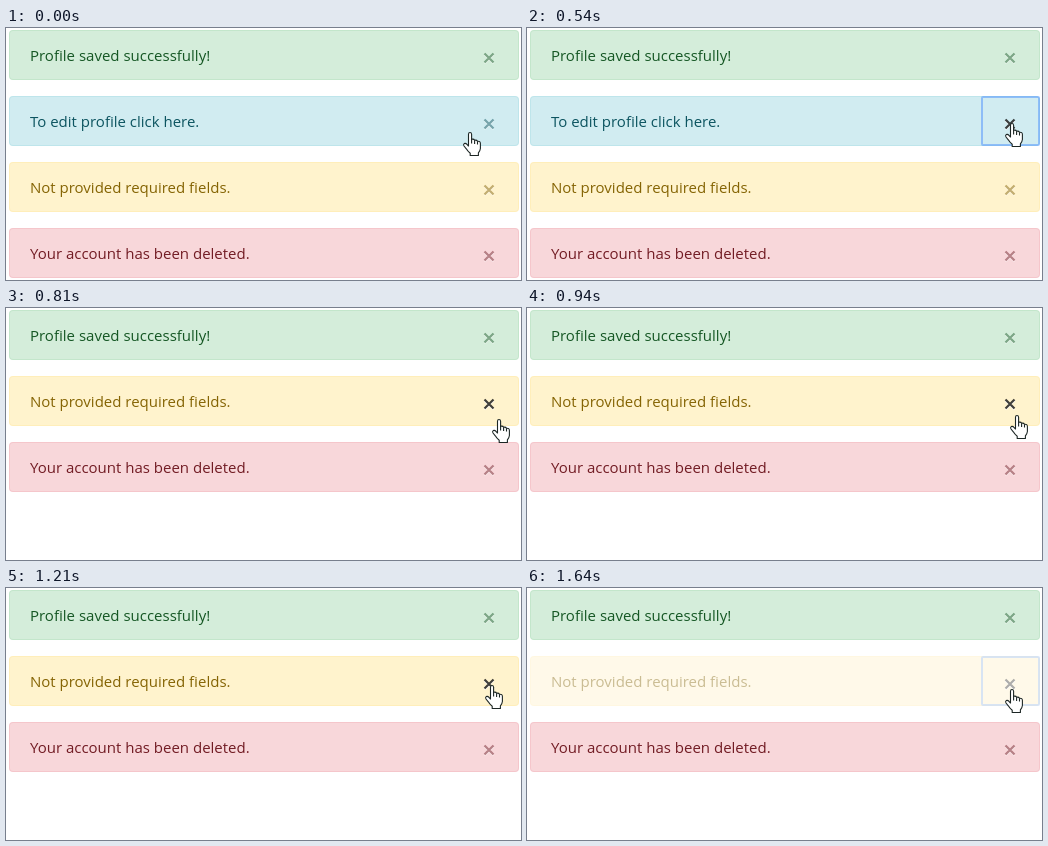
An HTML page with a canvas that plays this animation: 515x252 px, repeating every 1.77 s.

```html
<!DOCTYPE html>
<html lang="en">
<head>
<meta charset="utf-8">
<title>Dismissible alerts</title>
<style>
  html, body { margin: 0; width: 100%; height: 100%; overflow: hidden; background: #fff; }
  canvas { display: block; }
</style>
</head>
<body>
<canvas id="stage" width="515" height="252"></canvas>
<script>
const ctx = document.getElementById('stage').getContext('2d');
const LOOP = 1770;
const BOX = { x: 3, y: 2, w: 510, h: 50, step: 66 };

const success = { text: 'Profile saved successfully!', bg: '#d4edda', border: '#c3e6cb', ink: '#155724' };
const info = { text: 'To edit profile click here.', bg: '#d1ecf1', border: '#bee5eb', ink: '#0c5460' };
const warning = { text: 'Not provided required fields.', bg: '#fff3cd', border: '#ffeeba', ink: '#856404' };
const danger = { text: 'Your account has been deleted.', bg: '#f8d7da', border: '#f5c6cb', ink: '#721c24' };

const all = [success, info, warning, danger];
const rest = [success, warning, danger];

// The second alert is always the one being dismissed.
const poses = [
  { at: 0, alerts: all, hand: [457, 104] },
  { at: 60, alerts: all, hand: [478, 95], hover: true },
  { at: 540, alerts: all, hand: [478, 95], hover: true, focus: true },
  { at: 680, alerts: all, hand: [479, 96], hover: true, focus: true, opacity: 0.37 },
  { at: 810, alerts: rest, hand: [486, 111], hover: true },
  { at: 940, alerts: rest, hand: [483, 107], hover: true },
  { at: 1090, alerts: rest, hand: [480, 102], hover: true },
  { at: 1210, alerts: rest, hand: [479, 97], hover: true },
  { at: 1490, alerts: rest, hand: [479, 97], hover: true, focus: true },
  { at: 1640, alerts: rest, hand: [478, 101], hover: true, focus: true, opacity: 0.43 }
];

const handShape = new Path2D(
  'M5.5 14V2.2Q5.5.5 7 .5T8.6 2.2V7.3Q11 6.8 11.6 8.2Q13.8 7.8 14.5 9.2Q17.4 9 17.4 11.5' +
  'V16.5Q17.2 18.6 15.4 20.8V23.5H7.2V21.2Q4.5 19 3.3 16.8L1 14Q.1 12.4 1.2 11.6Q2.7 10.9 4 12.4Z');
const knuckles = new Path2D('M8.6 7V11.5M11.6 8.2V12M14.5 9.2V12.5');

function roundBox(x, y, w, h, r, color) {
  ctx.fillStyle = color;
  ctx.beginPath();
  ctx.roundRect(x, y, w, h, r);
  ctx.fill();
}

function cross(cx, cy, color) {
  const r = 4.5;
  ctx.strokeStyle = color;
  ctx.lineWidth = 2.2;
  ctx.beginPath();
  ctx.moveTo(cx - r, cy - r);
  ctx.lineTo(cx + r, cy + r);
  ctx.moveTo(cx + r, cy - r);
  ctx.lineTo(cx - r, cy + r);
  ctx.stroke();
}

function drawAlert(alert, y, { hover = false, focus = false, opacity = 1 }) {
  const { x, w, h } = BOX;
  roundBox(x, y, w, h, 4, alert.border);
  roundBox(x + 1, y + 1, w - 2, h - 2, 3, alert.bg);
  ctx.fillStyle = alert.ink;
  ctx.fillText(alert.text, 24, y + 31);

  ctx.globalAlpha = hover ? 0.75 : 0.5;
  cross(483, y + 29, '#fff');
  cross(483, y + 28, hover ? '#000' : alert.ink);
  ctx.globalAlpha = 1;

  if (focus) {
    ctx.strokeStyle = 'rgba(77, 144, 254, 0.5)';
    ctx.lineWidth = 2;
    ctx.beginPath();
    ctx.roundRect(455, y + 1, 57, h - 2, 1);
    ctx.stroke();
  }
  if (opacity < 1) {
    ctx.fillStyle = `rgba(255, 255, 255, ${1 - opacity})`;
    ctx.fillRect(x, y, w, h);
  }
}

function drawHand(x, y) {
  ctx.save();
  ctx.translate(x, y);
  ctx.fillStyle = '#fff';
  ctx.strokeStyle = '#1c2624';
  ctx.lineWidth = 1.1;
  ctx.lineJoin = 'round';
  ctx.fill(handShape);
  ctx.stroke(handShape);
  ctx.stroke(knuckles);
  ctx.restore();
}

function render() {
  const time = performance.now() % LOOP;
  const pose = poses.findLast(p => p.at <= time);
  ctx.fillStyle = '#fff';
  ctx.fillRect(0, 0, 515, 252);
  ctx.font = '15px "Open Sans", "Noto Sans", sans-serif';
  pose.alerts.forEach((alert, i) => drawAlert(alert, BOX.y + i * BOX.step, i === 1 ? pose : {}));
  drawHand(...pose.hand);
  requestAnimationFrame(render);
}

render();
</script>
</body>
</html>
```
